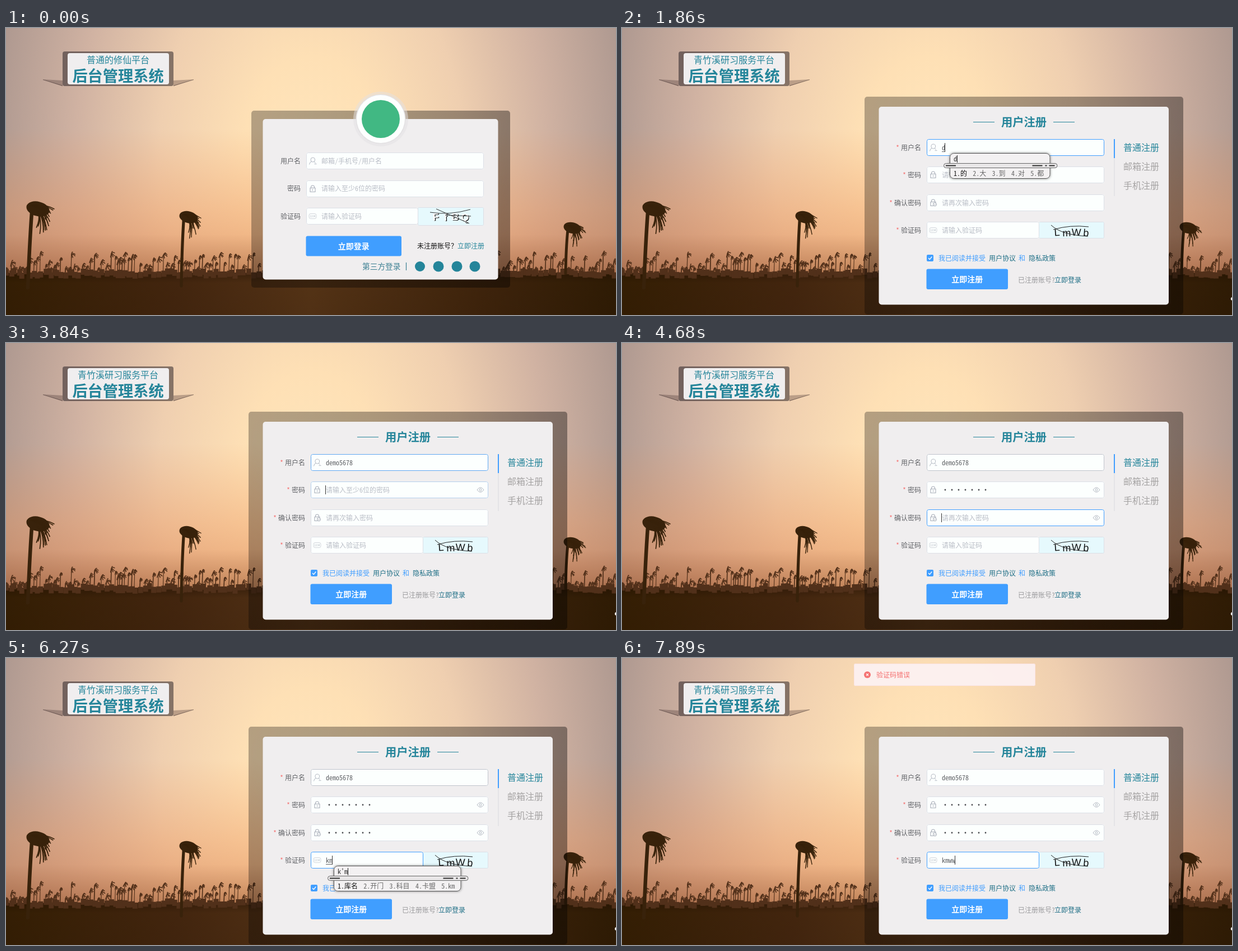
An HTML page with a canvas that plays this animation: 1089 px wide and 514 px high, repeating every 8000 ms.

```html
<!DOCTYPE html>
<html lang="zh">
<head>
<meta charset="utf-8">
<title>后台管理系统</title>
<style>
html, body { margin: 0; width: 100%; height: 100%; overflow: hidden; background: #3b2208; }
canvas { display: block; }
</style>
</head>
<body>
<canvas id="stage" width="1089" height="514"></canvas>
<script>
const W = 1089, H = 514, LOOP = 8000, STEP = 30;
const FONT = '"Noto Sans Mono CJK SC", "Noto Sans CJK SC", "Noto Sans CJK", monospace';
const TEAL = '#25859a', DEEP = '#1f6f86', BLUE = '#409eff', RED = '#f56c6c';
const GREY = '#606266', HINT = '#b9bdc6', CARD = '#f0eeef', EDGE = '#dcdfe6';
const stage = document.getElementById('stage').getContext('2d');
let g = stage;

// Drawing helpers
function text(str, x, y, { size = 12, color = GREY, bold = false, align = 'left' } = {}) {
  g.font = `${bold ? 700 : 400} ${size}px ${FONT}`;
  g.textAlign = align;
  g.fillStyle = color;
  g.fillText(str, x, Math.round(y + size * 0.38));
}
function box(x, y, w, h, r, fill, stroke) {
  g.beginPath();
  g.roundRect(x, y, w, h, r);
  if (fill) { g.fillStyle = fill; g.fill(); }
  if (stroke) {
    g.beginPath();
    g.roundRect(x + 0.5, y + 0.5, w - 1, h - 1, r);
    g.strokeStyle = stroke; g.lineWidth = 1; g.stroke();
  }
}
function disc(x, y, r, fill) {
  g.beginPath(); g.arc(x, y, r, 0, 7); g.fillStyle = fill; g.fill();
}
function path(d, color, width = 1) {
  g.strokeStyle = color; g.lineWidth = width; g.stroke(new Path2D(d));
}
function shape(d, fill) { g.fillStyle = fill; g.fill(new Path2D(d)); }
function gradient(grad, stops, x, y, w, h) {
  stops.forEach(([at, c]) => grad.addColorStop(at, c));
  g.fillStyle = grad;
  g.fillRect(x, y, w, h);
}
function cached(paint) {
  const c = document.createElement('canvas');
  c.width = W; c.height = H;
  g = c.getContext('2d');
  paint();
  g = stage;
  return c;
}
function seeded(seed) {
  return () => (seed = (seed * 16807) % 2147483647) / 2147483647;
}

// Scenery
function palm(x, y, foot, lean, s, rnd) {
  const dark = '#38220b';
  g.lineCap = 'round';
  path(`M${x + 9 * s} ${y + 22 * s} Q${x + 5 * s} ${(y + foot) / 2} ${x + lean} ${foot}`, dark, 6.5 * s);
  g.beginPath();
  g.ellipse(x + 20 * s, y + 16 * s, 21 * s, 13 * s, 0.25, 0, 7);
  g.fillStyle = dark; g.fill();
  for (let i = 0; i < 24; i++) {
    const a = 0.15 + i / 24 * 1.1, len = (36 + rnd() * 24) * s;
    const ex = x + 4 * s + len * Math.cos(a) * 0.85, ey = y + 8 * s + len * Math.sin(a);
    path(`M${x + 6 * s} ${y + 10 * s} Q${x + 30 * s} ${y + (4 + 14 * a) * s} ${ex} ${ey}`, dark, 1.7 * s);
  }
  g.lineCap = 'butt';
}
function treeLine(rnd) {
  const dark = '#51301a';
  for (let x = 0; x < W; x += 3 + rnd() * 7) {
    const top = 431 - 30 * rnd() ** 1.6, r = 2.5 + rnd() * 3;
    path(`M${x} ${top} L${x - 1} 441`, dark, 1 + rnd() * 0.8);
    for (let k = 0; k < 5; k++) {
      const a = k * 0.75 - 0.9 - rnd() * 0.5;
      path(`M${x} ${top} q${r * Math.cos(a)} ${r * Math.sin(a) - 1} ${r * 1.4 * Math.cos(a)} ${r * Math.sin(a) + 2}`, dark, 1.5);
    }
    g.fillStyle = dark;
    g.fillRect(x - 4, 430 + rnd() * 8, 9, 11);
  }
}
function scenery() {
  g.save();
  g.translate(545, 235);
  g.scale(1, 1.5);
  gradient(g.createRadialGradient(0, 0, 0, 0, 0, 680), [
    [0, '#ffe6bc'], [0.18, '#fee0b5'], [0.4, '#efcfb0'], [0.62, '#d0b2a2'], [0.85, '#ac978f'], [1, '#8f8488']], -W, -H, 2 * W, 2 * H);
  g.restore();
  gradient(g.createLinearGradient(0, 180, 0, 440),
    [[0, 'rgba(235,145,85,0)'], [0.55, 'rgba(235,145,85,.36)'], [1, 'rgba(215,120,65,.55)']], 0, 180, W, 260);
  gradient(g.createLinearGradient(0, 370, 0, 440),
    [[0, 'rgba(110,60,30,0)'], [1, 'rgba(110,60,30,.3)']], 0, 370, W, 70);
  gradient(g.createLinearGradient(0, 0, W, 0),
    [[0, '#372004'], [0.28, '#472810'], [0.5, '#5a3718'], [0.78, '#42260d'], [1, '#311d05']], 0, 439, W, 75);
  gradient(g.createLinearGradient(0, 437, 0, 514),
    [[0, 'rgba(25,12,0,.45)'], [0.25, 'rgba(25,12,0,.1)'], [1, 'rgba(25,12,0,.15)']], 0, 438, W, 76);

  const rnd = seeded(77);
  treeLine(rnd);
  palm(37, 308, 465, 2, 1, rnd);
  palm(310, 326, 462, 3, 0.8, rnd);
  palm(996, 346, 440, 3, 0.76, rnd);
}
function badge(title) {
  shape('M66 92 L101 94 V104 Z M335 92 L299 94 V104 Z', 'rgba(60,40,40,.3)');
  path('M66 92.5 L101 103.5 M335 92.5 L299 103.5', 'rgba(50,35,35,.55)');
  box(101, 42, 198, 62, 4, 'rgba(30,25,30,.5)');
  box(110, 45, 181, 56, 4, CARD);
  text(title, 200, 57, { size: 16, color: TEAL, align: 'center' });
  text('后台管理系统', 200, 85.5, { size: 27.2, color: TEAL, bold: true, align: 'center' });
}
function frame(x, y, w, h) {
  const shade = g.createLinearGradient(x, y, x + w, y + h * 0.4);
  shade.addColorStop(0, 'rgba(0,0,0,.29)');
  shade.addColorStop(1, 'rgba(0,0,0,.38)');
  box(x, y, w, h, 5, shade);
}

// Form parts
const icons = {
  user(x, y) {
    path(`M${x - 3.5} ${y - 2} a3.8 4 0 1 1 7.6 0 a3.8 4 0 1 1 -7.6 0 M${x - 6} ${y + 6.5} q.5 -4.5 4 -5.3 M${x + 2} ${y + 1.3} q2 .6 3 2.7 M${x + 3} ${y + 5.5} h4`, '#b4b9c3');
  },
  lock(x, y) {
    path(`M${x - 4.5} ${y - 1.5} h9 v7 h-9 z M${x - 3} ${y - 1.5} v-1.5 a3 3 0 0 1 6 0 v1.5 M${x} ${y + 0.5} v3`, '#a9aeb9', 1.1);
  },
  safe(x, y) {
    icons.lock(x, y);
    disc(x + 3, y + 3, 3.2, '#fdfffe');
    path(`M${x} ${y + 3} a3 3 0 1 0 6 0 a3 3 0 1 0 -6 0 M${x + 1.6} ${y + 3} l1.2 1.2 l2 -2`, '#a9aeb9');
  },
  code(x, y) {
    box(x - 7, y - 5, 14, 10, 3, null, '#d3d6dc');
    text('1234', x, y, { size: 5, color: '#b4b9c3', align: 'center' });
  },
  eye(x, y) {
    path(`M${x - 6} ${y} q6 -8.5 12 0 q-6 8.5 -12 0 M${x - 2} ${y} a2 2 0 1 0 4 0 a2 2 0 1 0 -4 0`, '#b4b9c3');
  }
};
function field(x, y, w, icon, border = EDGE) {
  box(x, y - 15, w, 30, 3, '#fcfffe', border);
  icons[icon](x + 11.5, y);
}
function button(x, y, w, h, label) {
  box(x, y, w, h, 3, BLUE);
  text(label, x + w / 2, y + h / 2, { size: 14, color: '#fff', bold: true, align: 'center' });
}
function captcha(letters, x, y, embossed) {
  g.font = `${embossed ? 700 : 400} 18px "Liberation Sans", sans-serif`;
  g.textAlign = 'center';
  [...letters].forEach((ch, i) => {
    g.save();
    g.translate(x + i * 17, y + 6 + i % 2);
    g.rotate((i - 1.5) * 0.05);
    g.fillStyle = '#111';
    g.fillText(ch, 0, 0);
    if (embossed) {
      g.fillStyle = '#fff';
      g.fillText(ch, -1.2, -0.8);
    }
    g.restore();
  });
}

const loginPage = cached(() => {
  scenery();
  badge('普通的修仙平台');
  frame(438, 148, 462, 317);
  box(458.5, 163, 420, 287.5, 5, CARD);
  disc(669, 163, 49, 'rgba(228,225,227,.5)');
  disc(669, 163, 44.5, '#e3e1e3');
  disc(669, 163, 43, '#fdfffe');
  disc(669, 163, 34, '#41b883');
  [['用户名', 238, 'user', '邮箱/手机号/用户名'], ['密码', 287.5, 'lock', '请输入至少6位的密码'], ['验证码', 337, 'code', '请输入验证码']]
    .forEach(([label, y, icon, hint]) => {
      text(label, 526, y, { align: 'right' });
      field(536, Math.round(y), icon === 'code' ? 200 : 317, icon);
      text(hint, 563, y, { color: HINT });
    });
  box(735, 321, 118, 33, 2, '#e6f9fd', EDGE);
  captcha('FfBQ', 769, 339, true);
  path('M768 324 L827 350 M757 330 Q790 336 829 325 M784 335 L830 337', '#333');
  button(535.5, 372.5, 170.5, 36, '立即登录');
  text('未注册账号？', 734, 390, { color: '#111' });
  text('立即注册', 806, 390, { color: TEAL });
  text('第三方登录', 636, 427, { size: 13.7, color: '#3b7f92' });
  path('M714.5 420 V434', '#3b7f92', 1.2);
  disc(739, 427, 9, TEAL);
  disc(837, 427, 9.5, TEAL);
});

const signupPage = cached(() => {
  scenery();
  badge('青竹溪研习服务平台');
  frame(433, 123, 569, 390);
  box(458.5, 141, 517.5, 354.5, 5, CARD);
  text('用户注册', 717.5, 168, { size: 20.3, color: TEAL, bold: true, align: 'center' });
  path('M627 168.5 H665 M770 168.5 H808', TEAL);
  g.fillStyle = '#e4e3e7'; g.fillRect(878, 199, 2, 102);
  g.fillStyle = BLUE; g.fillRect(878, 199, 2, 34);
  ['普通注册', '邮箱注册', '手机注册'].forEach((s, i) =>
    text(s, 895, 214 + i * 34.2, { size: 16, color: i ? '#a5a3a3' : TEAL }));
  box(744, 347, 117, 30, 2, '#e6f9fd', EDGE);
  box(544, 406, 12, 12, 2, BLUE);
  path('M547 412 l2.3 2.5 l4 -5', '#fff', 1.3);
  text('我已阅读并接受', 565, 412, { color: BLUE });
  text('用户协议', 655, 412, { color: DEEP });
  text('和', 708, 412, { color: BLUE });
  text('隐私政策', 726, 412, { color: DEEP });
  button(543.5, 431.5, 145.5, 36.5, '立即注册');
  text('已注册账号?', 707, 451, { color: '#9a9a9c' });
  text('立即登录', 772, 451, { color: DEEP });
  disc(1090, 485, 3.2, '#fff');
});

// Timeline
const fields = [
  { label: '用户名', hint: '请输入至少6位的用户名', y: 214, icon: 'user', from: 720, to: 3810,
    keys: [[1860, 'd'], [1950, 'de'], [2010, 'dem'], [2100, 'demo'], [2550, 'demo5'], [2640, 'demo56'], [2700, 'demo567'], [3540, 'demo5678']],
    compose: [1860, 2250] },
  { label: '密码', hint: '请输入至少6位的密码', y: 263, icon: 'lock', from: 3810, to: 4560,
    dots: [3990, 4050, 4080, 4140, 4320, 4350, 4380] },
  { label: '确认密码', hint: '请再次输入密码', y: 313, icon: 'safe', from: 4560, to: 5430,
    dots: [4830, 4860, 4920, 4950, 5100, 5140, 5190] },
  { label: '验证码', hint: '请输入验证码', y: 362, icon: 'code', from: 5430, to: 1e9, w: 201,
    keys: [[6210, 'k'], [6270, 'km'], [6390, 'kmw'], [6450, 'kmww']],
    compose: [6210, 6600] }
];
const caretOff = [[1320, 1650], [3030, 3330], [5730, 6030], [6930, 7260], [7560, 7890]];
const within = (t, [a, b]) => t >= a && t < b;
const clamp = v => Math.max(0, Math.min(1, v));
const candidates = {
  d: ["d", '的 大 到 对 都'],
  de: ["de", '的 得 德 地 嘚'],
  dem: ["de'm", '的吗 的美 的们 的门 的密'],
  demo: ["de'mo", '的模样 的模式 的末尾 的墨水 的魔法'],
  k: ["k", '看 可 快 开 口'],
  km: ["k'm", '库名 开门 科目 卡盟 km'],
  kmw: ["k'm'w", '开门万 开门 科目 库名 看'],
  kmww: ["k'm'w'w", '快马弯弯 开门 科目 库名 k']
};

function popup(y, typed) {
  const [spelling, words] = candidates[typed];
  const items = words.split(' ').map((w, i) => `${i + 1}.${w}`);
  g.font = `12px ${FONT}`;
  const starts = [];
  let x = 592;
  items.forEach(s => { starts.push(x); x += g.measureText(s).width + 10.3; });
  const right = x + 1;
  g.save();
  g.shadowColor = 'rgba(0,0,0,.5)'; g.shadowBlur = 4;
  box(585, y, right - 585, 46, 7, '#f3f1f2');
  g.restore();
  box(585, y, right - 585, 46, 7, null, '#555');
  box(574, y + 18, right - 561, 9, 4.5, '#e9e7e8', '#666');
  const mid = y + 22.5;
  path(`M578 ${mid} H596 M${right - 32} ${mid} H${right - 14} M${right - 9} ${mid} h3 M${right - 2} ${mid} h10`, '#333', 2);
  text(spelling, 592, y + 10, { color: '#333' });
  const caretX = Math.round(592 + g.measureText(spelling).width) + 0.5;
  path(`M${caretX} ${y + 4} v13`, '#222');
  items.forEach((s, i) => text(s, starts[i], y + 36, { color: i ? '#666' : '#111' }));
}

function fieldBorder(f, i, t) {
  const rest = i === 0 && t >= 3810 && t < 7890 ? [192, 196, 204] : [220, 223, 230];
  const p = clamp((t - f.from) / 120) * (1 - clamp((t - f.to) / 120));
  return `rgb(${rest.map((v, k) => v + ([64, 158, 255][k] - v) * p)})`;
}

function drawField(f, i, t) {
  const { y } = f, active = within(t, [f.from, f.to]);
  g.font = `12px ${FONT}`;
  text('*', 534 - f.label.length * 12 - 9, y, { color: RED });
  text(f.label, 534, y, { align: 'right' });
  field(544, y, f.w || 317, f.icon, fieldBorder(f, i, t));
  let end = 571;
  if (f.dots) {
    const n = f.dots.filter(at => t >= at).length;
    for (let k = 0; k < n; k++) disc(577 + k * 12, y, 1.4, '#4a4c50');
    end += n * 12;
    if (t >= f.from) icons.eye(847, y);
  } else {
    const typed = f.keys.filter(([at]) => t >= at).map(k => k[1]).pop() || '';
    text(typed, 571, y);
    end += typed.length * 6;
    if (within(t, f.compose)) path(`M571 ${y + 7.5} H${end}`, GREY);
  }
  if (end === 571) text(f.hint, 571, y, { color: HINT });
  if (active && !caretOff.some(r => within(t, r))) {
    g.fillStyle = '#333';
    g.fillRect(end > 571 ? end - 1 : 570, y - 8, 1, 16);
  }
}

function toast(t) {
  const u = clamp((t - 6930) / 390);
  if (!u) return;
  const y = 10 - Math.round(40 * (1 - u) ** 2);
  g.save();
  g.globalAlpha = clamp(u * 2) * 0.96;
  box(414, y, 324, 40, 3, u < 0.8 ? '#fae8ea' : '#fcf1f1', '#fbe3e3');
  disc(438, y + 20, 6, RED);
  path(`M436 ${y + 18} l4 4 m0 -4 l-4 4`, '#fff', 1.2);
  text('验证码错误', 454, y + 20, { color: RED });
  g.restore();
}

function drawLogin(t) {
  g.drawImage(loginPage, 0, 0);
  [[772, 270], [805, 300]].forEach(([x, at]) => {
    g.globalAlpha = within(t, [at, at + 90]) ? 0.75 : 1;
    disc(x, 427, 9.5, TEAL);
  });
  g.globalAlpha = 1;
}

function drawSignup(t) {
  g.drawImage(signupPage, 0, 0);
  fields.forEach((f, i) => drawField(f, i, t));
  if (t >= 900) {
    captcha('LmWb', 777, 366, false);
    path('M766 353 Q785 371 832 373 M770 361 Q800 352 833 356', '#222');
  }
  fields.forEach(f => {
    if (f.compose && within(t, f.compose)) popup(f.y + 10, f.keys.filter(([at]) => t >= at).pop()[1]);
  });
  toast(t);
}

function tick(now) {
  const t = Math.floor((now % LOOP) / STEP) * STEP;
  if (t < 630) drawLogin(t); else drawSignup(t);
  requestAnimationFrame(tick);
}
tick(performance.now());
</script>
</body>
</html>
```
